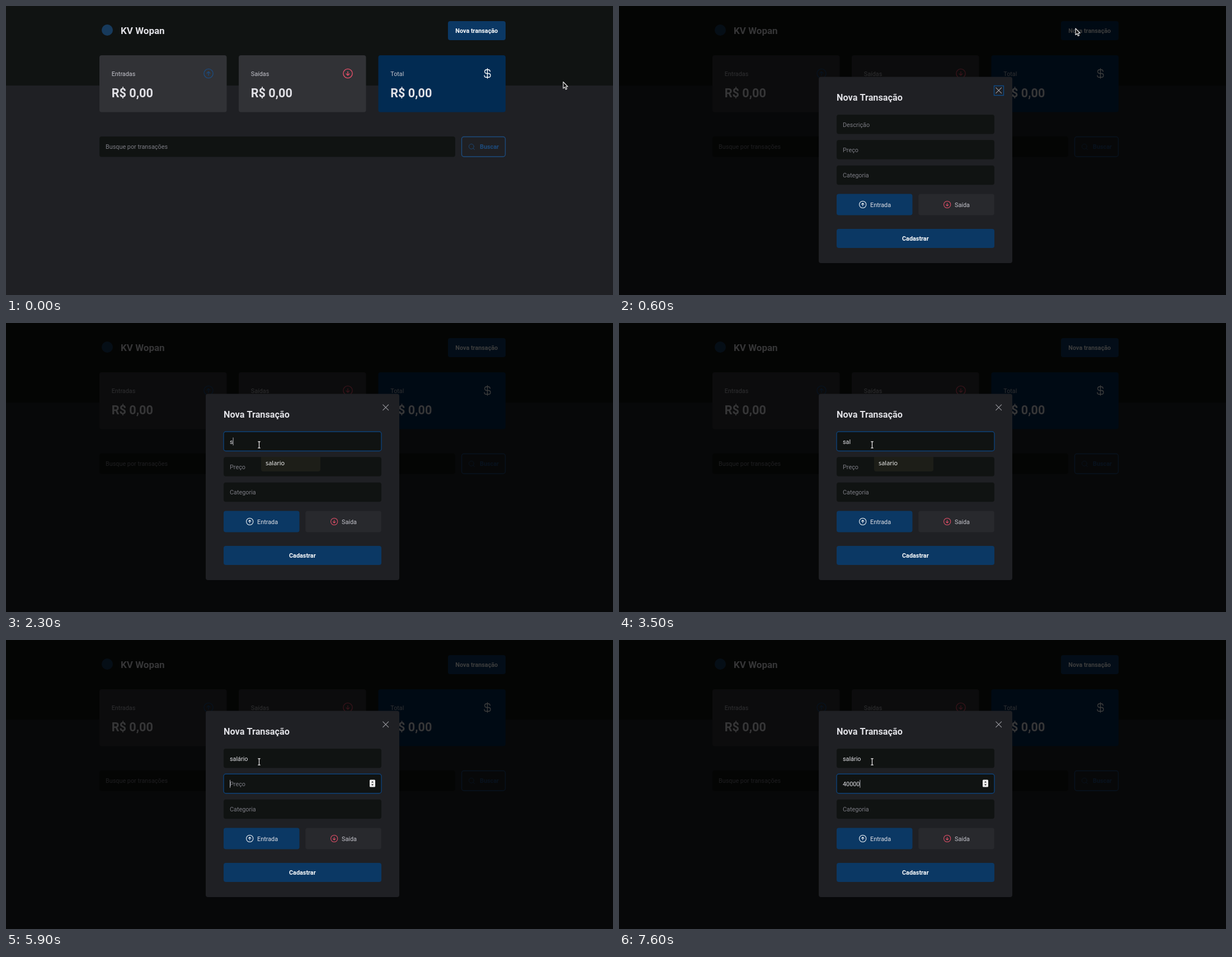
An HTML page with a canvas for the animation above (8000 ms loop, 1085 px wide and 516 px high).

```html
<!DOCTYPE html>
<html lang="pt-BR">
<head>
<meta charset="utf-8">
<style>
  html, body { margin: 0; width: 100%; height: 100%; overflow: hidden; background: #1f2024; }
  canvas { display: block; }
</style>
</head>
<body>
<canvas id="stage" width="1085" height="516"></canvas>
<script>
const ctx = document.getElementById('stage').getContext('2d');
const LOOP = 8000, BASE = 10.84;
const C = {
  header: '#101312', body: '#1f2024', card: '#313236', field: '#101312',
  blue: '#0b3864', deep: '#022b52', line: '#1d4b7d', red: '#e8506a',
  text: '#e1e1e6', soft: '#c4c4cc', hint: '#7c7c84', white: '#fff'
};

// Icons on a 256 grid
const RING = 'M224 128A96 96 0 1 1 32 128A96 96 0 1 1 224 128';
const ICONS = {
  up: RING + 'M94 122L128 88L162 122M128 168V88',
  down: RING + 'M94 134L128 168L162 134M128 88V168',
  dollar: 'M128 24V232M184 88a40 40 0 0 0-40-40H112a40 40 0 0 0 0 80h40a40 40 0 0 1 0 80H104a40 40 0 0 1-40-40',
  search: 'M200 116A84 84 0 1 1 32 116A84 84 0 1 1 200 116M175 175L224 224',
  close: 'M200 56L56 200M200 200L56 56'
};

// Pointers relative to their hot spot
const ARROW = new Path2D('M0 0V11.6L2.7 9.2L4.6 13.4L6.6 12.5L4.7 8.5H8.2Z');
const HAND = new Path2D('M-1 1Q0-.7 1.1 1V5L6 6Q7.2 6.3 7 8L6.2 12.5H.3L-3 8.2Q-3 6.4-1 7.5Z');
const BEAM = new Path2D('M-2.2-5.7H-.6L0-5.2L.6-5.7H2.2M0-5.2V5.2M-2.2 5.7H-.6L0 5.2L.6 5.7H2.2');

const DESCRIPTION = [[2300, 's'], [2600, 'sa'], [2700, 'sal'], [3800, 'salá'], [4200, 'salári'], [4400, 'salário']];
const PRICE = [[6800, '4'], [7100, '40'], [7300, '400'], [7400, '4000'], [7600, '40000']];
const CARET_OFF = [[3500, 3700], [5300, 5900], [6500, 6800]];
const HISTORY = ['salario', 'aluguel', 'mercado', 'internet', 'desenvolvimento de site'];

function box(x, y, w, h, fill, r = 4, stroke) {
  ctx.beginPath();
  ctx.roundRect(x, y, w, h, r);
  if (fill) { ctx.fillStyle = fill; ctx.fill(); }
  if (stroke) { ctx.strokeStyle = stroke; ctx.lineWidth = 1.4; ctx.stroke(); }
}

// y is the middle of the capitals
function text(str, x, y, color, { size = BASE, weight = 400, family = 'Roboto', align = 'left' } = {}) {
  ctx.font = `${weight} ${size}px ${family}, sans-serif`;
  ctx.textAlign = align;
  ctx.fillStyle = color;
  ctx.fillText(str, x, y + size * 0.355);
}

function icon(name, x, y, size, color) {
  ctx.save();
  ctx.translate(x - size / 2, y - size / 2);
  ctx.scale(size / 256, size / 256);
  ctx.lineWidth = 16;
  ctx.lineCap = ctx.lineJoin = 'round';
  ctx.strokeStyle = color;
  ctx.stroke(new Path2D(ICONS[name]));
  ctx.restore();
}

function summary(x, label, fill, iconName, iconColor) {
  box(x, 88, 227.5, 101.5, fill);
  text(label, x + 21.7, 121, C.soft);
  icon(iconName, x + 195, 120.5, 21.7, iconColor);
  text('R$ 0,00', x + 21.7, 155.5, C.text, { size: 21.68, weight: 700 });
}

function page(hover) {
  ctx.fillStyle = C.body;
  ctx.fillRect(0, 0, 1085, 516);
  ctx.fillStyle = C.header;
  ctx.fillRect(0, 0, 1085, 142);
  box(171, 33, 20, 20, '#173a5c', 10);
  text('KV Wopan', 205, 44, C.text, { size: 17, weight: 700 });
  box(790, 27, 103, 34, hover ? C.deep : C.blue);
  text('Nova transação', 841.3, 44.5, C.white, { weight: 700, align: 'center' });
  summary(167, 'Entradas', C.card, 'up', C.line);
  summary(416, 'Saídas', C.card, 'down', C.red);
  summary(665.5, 'Total', C.deep, 'dollar', C.white);
  box(167, 233, 636, 36.5, C.field);
  text('Busque por transações', 178, 251.5, C.hint);
  box(814.5, 233.5, 78, 35.5, null, 4, C.line);
  icon('search', 832.5, 251.5, 13.5, C.line);
  text('Buscar', 847, 251.5, C.line, { weight: 700 });
}

function field(y, hint, value, focused, caret) {
  box(389, y, 282, 34.5, C.field, 4, focused && '#0d4178');
  text(value || hint, 400, y + 17.8, value ? C.text : C.hint);
  if (focused && caret) {
    ctx.fillStyle = C.soft;
    ctx.fillRect(400 + (value ? ctx.measureText(value).width : 0), y + 10.5, 0.9, 14);
  }
}

function spinner() {
  box(650, 249.5, 10, 13, '#eee', 1.5);
  ctx.fillStyle = '#222';
  ctx.fill(new Path2D('M653 254.5L655 252L657 254.5ZM653 257.5L655 260L657 257.5Z'));
}

function suggestions(rows, width, alpha) {
  ctx.globalAlpha = alpha;
  box(456, 239, width, 1.5 + rows.length * 24.5, '#1d1e18', [0, 0, 4, 4]);
  rows.forEach((row, i) =>
    text(row, 464, 250.5 + i * 24.5, '#eee', { size: 10.9, weight: 500, family: '"Noto Sans"' }));
  ctx.globalAlpha = 1;
}

const typed = (steps, t) => steps.reduce((last, [at, str]) => t >= at ? str : last, '');

function modal(t) {
  const caret = !CARET_OFF.some(([from, to]) => t >= from && t < to);
  const onPrice = t >= 4700, onDescription = t >= 1500 && !onPrice;
  ctx.fillStyle = 'rgba(0,0,0,.76)';
  ctx.fillRect(0, 0, 1085, 516);
  box(357, 126.5, 346, 332.5, C.body);
  text('Nova Transação', 389, 163, C.text, { size: 16.26, weight: 700 });
  icon('close', 678.7, 150.7, 17.5, '#9a9aa0');
  if (t < 1500) box(670.5, 142.5, 17, 17, null, 0, '#0f4a85');
  field(194, 'Descrição', typed(DESCRIPTION, t), onDescription, caret);
  field(239.3, 'Preço', typed(PRICE, t), onPrice, caret);
  field(284.7, 'Categoria', '', false);
  if (onPrice) spinner();
  box(389, 335.5, 135.5, 38, C.blue);
  icon('up', 435.7, 354.5, 16.26, C.white);
  text('Entrada', 449, 355, C.text);
  box(535.3, 335.5, 135.5, 38, '#28292d');
  icon('down', 586.7, 354.5, 16.26, C.red);
  text('Saída', 600, 355, C.soft);
  box(389, 398, 282, 34, C.blue);
  text('Cadastrar', 529.8, 415.3, C.white, { weight: 700, align: 'center' });
  if (t >= 1500 && t < 2300) suggestions(HISTORY, 162, 1);
  else if (t >= 2300 && t < 4000) suggestions(['salario'], 106, Math.min(1, (4000 - t) / 400));
}

const ease = (t, from, to) => {
  const p = Math.min(1, Math.max(0, (t - from) / (to - from)));
  return p * p * (3 - 2 * p);
};

function pointerAt(t) {
  const a = ease(t, 0, 450), b = ease(t, 600, 1300);
  return {
    x: 996 - 180 * a - 363 * b - (t >= 1900 ? 0.5 : 0),
    y: 135.5 - 95.5 * a + 177.5 * b
  };
}

function pointer({ x, y }, kind) {
  ctx.save();
  ctx.translate(x, y);
  ctx.lineJoin = 'round';
  if (kind === 'beam') {
    for (const [width, color] of [[2.4, '#111'], [1.2, '#eee']]) {
      ctx.lineWidth = width;
      ctx.strokeStyle = color;
      ctx.stroke(BEAM);
    }
  } else {
    const hand = kind === 'hand', path = hand ? HAND : ARROW;
    ctx.lineWidth = 1.1;
    ctx.fillStyle = hand ? '#fff' : '#151515';
    ctx.strokeStyle = hand ? '#222' : '#eee';
    ctx.fill(path);
    ctx.stroke(path);
  }
  ctx.restore();
}

function draw(now) {
  const t = Math.floor(now % LOOP / 100) * 100;
  const open = t >= 600;
  const p = pointerAt(t);
  const onButton = !open && p.x > 790 && p.x < 893 && p.y > 27 && p.y < 61;
  const onField = open && p.x > 389 && p.x < 671 && p.y > 194 && p.y < 228;
  page(onButton || t >= 600 && t < 800);
  if (open) modal(t);
  pointer(p, onButton ? 'hand' : onField ? 'beam' : 'arrow');
  requestAnimationFrame(draw);
}
requestAnimationFrame(draw);
</script>
</body>
</html>
```
